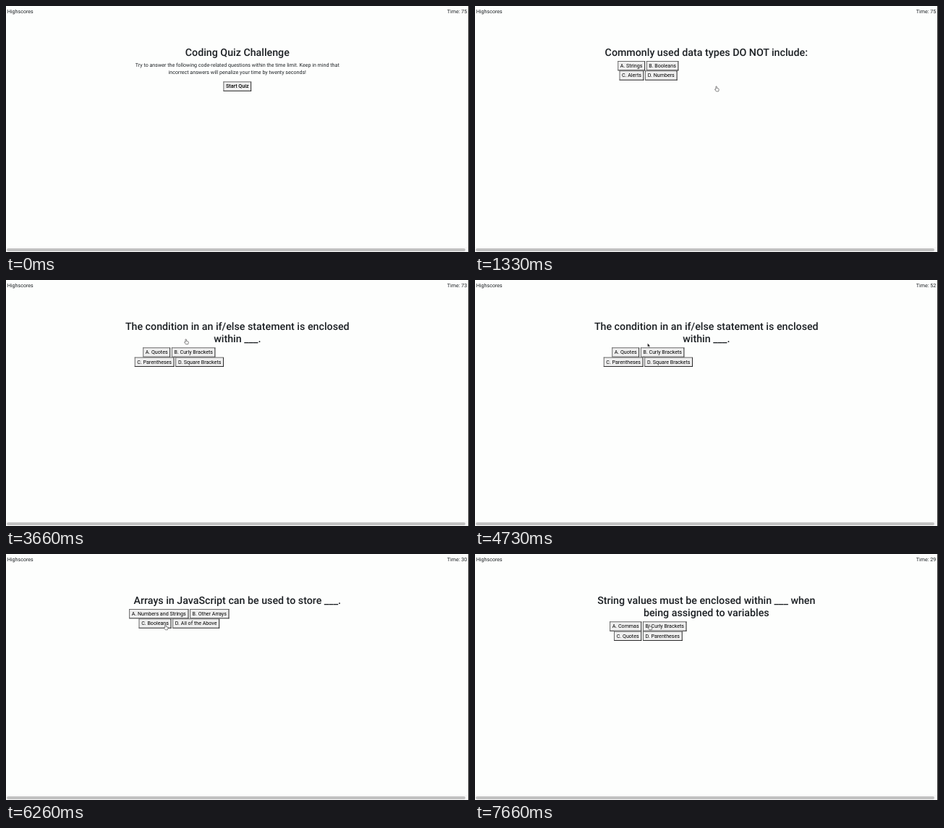
These frames come from a looping animation (640x340 px, 8 s). An HTML page:

```html
<!DOCTYPE html>
<html lang="en">
<head>
<meta charset="utf-8">
<title>Coding Quiz</title>
<style>
  html, body { margin: 0; width: 100%; height: 100%; overflow: hidden; background: #fdfefd; }
  #stage { position: relative; width: 640px; height: 340px; overflow: hidden; }
  /* The page is laid out at 1440 x 765 and shown at 4/9 */
  #page {
    position: absolute; left: 0; top: 0; width: 1439px; height: 765px;
    transform: scale(.444444); transform-origin: 0 0;
    font: 400 16px/24px Roboto, Arial, sans-serif; color: #1c2024;
    text-align: center; text-rendering: geometricPrecision;
  }
  #scores, #time { position: absolute; top: 6px; white-space: pre; }
  #scores { left: 4px; }
  #time { right: 5px; }
  .scene { position: absolute; left: 0; top: 125px; width: 100%; white-space: nowrap; }
  h2 { margin: 0 0 8px; font-size: 32px; font-weight: 500; line-height: 38.4px; }
  p { margin: 0 0 16px; }
  .answers { width: 1077px; }
  button {
    margin: 0; padding: 1px 6px; border: 2px solid; border-radius: 0;
    border-color: #5a5a5a #111 #111 #5a5a5a;
    background: #efefef; color: #000; font: inherit; appearance: none;
  }
  .start { font-weight: 500; }
  .down { border-color: #111 #5a5a5a #5a5a5a #111; }
  #bar { position: absolute; left: 0; top: 333px; width: 639px; height: 7px; background: #f8f8f8; }
  #bar i { position: absolute; left: 1px; top: 2px; width: 634px; height: 4px; border-radius: 2px; background: #c1c1c1; }
  #edge { position: absolute; right: 0; top: 0; width: 1px; height: 100%; background: #2a2a2a; }
  svg { position: absolute; left: 0; top: 0; }
</style>
</head>
<body>
<div id="stage">
  <div id="page">
    <div id="scores">Highscores</div>
    <div id="time"></div>
  </div>
  <div id="bar"><i></i></div>
  <div id="edge"></div>
  <svg width="640" height="340" viewBox="0 0 640 340">
    <path id="arrow" d="M0 0V5.2L1.2 4.1 2 5.9 2.8 5.5 2 3.8H3.7Z" fill="#111" stroke="#fff" stroke-width=".3"/>
    <path id="hand" d="M-.7 3.7V.7a.7.7 0 0 1 1.4 0V2.6L2.6 3q.9.2.9 1.1V5.3L2.9 7H-.1L-2 4.5q-.1-.9.7-.7L-.7 4.3Z"
      fill="#fff" stroke="#222" stroke-width=".55" stroke-linejoin="round"/>
  </svg>
</div>
<script>
const LOOP = 8000, PRESS = 130, FIRST_TICK = 1260;

const scenes = [
  { at: 0, title: 'Coding Quiz Challenge',
    intro: 'Try to answer the following code-related questions within the time limit. Keep in mind that<br>' +
           'incorrect answers will penalize your time by twenty seconds!' },
  { at: 1330, title: 'Commonly used data types DO NOT include:',
    answers: ['Strings', 'Booleans', 'Alerts', 'Numbers'] },
  { at: 3660, title: 'The condition in an if/else statement is enclosed<br>within ___.',
    answers: ['Quotes', 'Curly Brackets', 'Parentheses', 'Square Brackets'] },
  { at: 5660, title: 'Arrays in JavaScript can be used to store ___.',
    answers: ['Numbers and Strings', 'Other Arrays', 'Booleans', 'All of the Above'] },
  { at: 7660, title: 'String values must be enclosed within ___ when<br>being assigned to variables',
    answers: ['Commas', 'Curly Brackets', 'Quotes', 'Parentheses'] }
];

// Pointer moves; each one begins where the previous one ended
const entry = { x: 419, y: 147 };
const moves = [
  { from: 130, to: 460, x: 336.5, y: 111 },
  { from: 660, to: 930, x: 333.6, y: 111 },
  { from: 1590, to: 1600, x: 326, y: 111.2 },
  { from: 2070, to: 2730, x: 290.5, y: 91 },
  { from: 2730, to: 2930, x: 248.7, y: 81.8 },
  { from: 4060, to: 5000, x: 236, y: 88.8 },
  { from: 5000, to: 5330, x: 220.4, y: 97.8 },
  { from: 6660, to: 7260, x: 241.2, y: 97.8 }
];

const $ = id => document.getElementById(id);
const smooth = u => u * u * (3 - 2 * u);
const sceneAt = t => scenes.findLastIndex(s => s.at <= t);

for (const s of scenes) {
  const b = (s.answers || []).map((a, i) => `<button>${'ABCD'[i]}. ${a}</button>`);
  s.el = document.createElement('div');
  s.el.className = 'scene';
  s.el.innerHTML = `<h2>${s.title}</h2>` + (s.intro
    ? `<p>${s.intro}</p><button class="start">Start Quiz</button>`
    : `<div class="answers">${b[0]} ${b[1]}<br>${b[2]} ${b[3]}</div>`);
  $('page').append(s.el);
  s.buttons = [...s.el.querySelectorAll('button')];
}

// Hold time on a 15 per second grid, rounded down to 10 ms
function hold(t) {
  const k = Math.ceil((Math.floor(t / 10) + 1) * 3 / 20) - 1;
  return Math.floor(k * 20 / 3) * 10;
}

function buttonAt(scene, { x, y }) {
  return scene.buttons.find(b => {
    const r = b.getBoundingClientRect();
    return x >= r.left && x <= r.right && y >= r.top && y <= r.bottom;
  });
}

// The shape is only updated while the pointer moves
function pointer(t) {
  const i = moves.findLastIndex(m => m.from <= t);
  if (i < 0) return { ...entry, shape: 'none' };
  const m = moves[i], start = moves[i - 1] || entry;
  const seen = Math.min(t, m.to);
  const u = smooth((seen - m.from) / (m.to - m.from));
  const p = { x: start.x + (m.x - start.x) * u, y: start.y + (m.y - start.y) * u };
  p.shape = buttonAt(scenes[sceneAt(seen)], p) ? 'hand' : 'arrow';
  return p;
}

// One second per tick, and twenty more for every answer so far (all wrong)
function timeLeft(t) {
  const ticks = Math.max(0, Math.floor((t - FIRST_TICK) / 1000));
  const wrong = Math.max(0, sceneAt(FIRST_TICK + ticks * 1000) - 1);
  return 75 - ticks - 20 * wrong;
}

function draw(t) {
  const n = sceneAt(t), p = pointer(t);
  const next = scenes[n + 1];
  const pressed = next && t >= next.at - PRESS && buttonAt(scenes[n], p);
  scenes.forEach((s, i) => { s.el.style.visibility = i === n ? 'visible' : 'hidden'; });
  for (const b of scenes[n].buttons) b.classList.toggle('down', b === pressed);
  $('time').textContent = 'Time: ' + timeLeft(t);
  for (const shape of ['arrow', 'hand']) {
    $(shape).style.display = p.shape === shape ? 'inline' : 'none';
    $(shape).setAttribute('transform', `translate(${p.x} ${p.y})`);
  }
}

const begin = performance.now();
function tick() {
  draw(hold((performance.now() - begin) % LOOP));
  requestAnimationFrame(tick);
}
tick();
</script>
</body>
</html>
```
